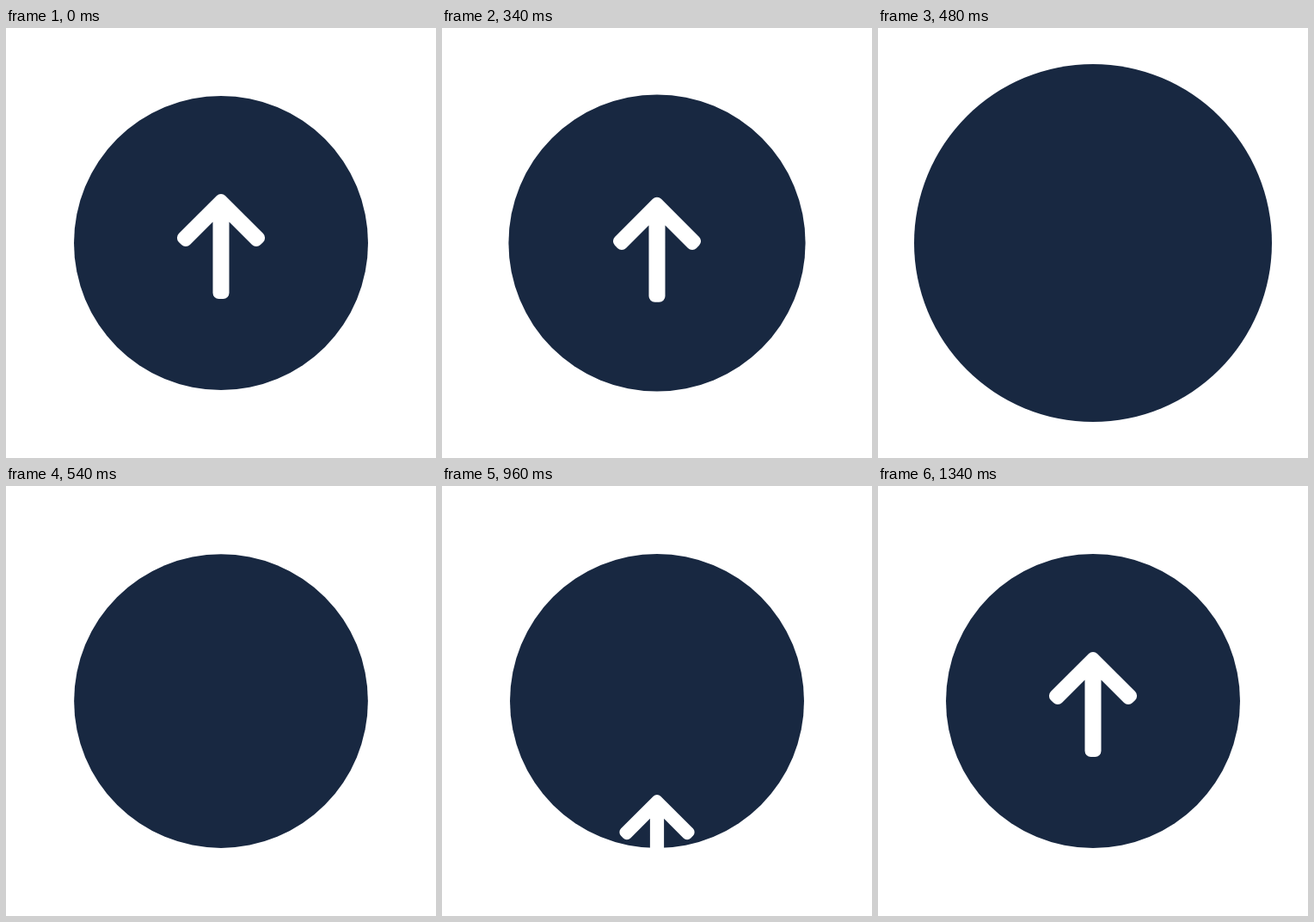
Animation, 500 px wide and 500 px high, one loop 1.36 s. Source, as an HTML page:

```html
<!DOCTYPE html>
<html lang="en">
<head>
<meta charset="utf-8">
<title>Arrow button</title>
<style>
html, body { margin: 0; width: 100%; height: 100%; overflow: hidden; background: #fff; }
svg { display: block; width: 100%; height: 100%; }
</style>
</head>
<body>
<svg viewBox="0 0 500 500">
  <circle id="disc" cx="250" cy="250" r="171" fill="#182841"/>
  <path id="arrow" fill="#fff" stroke="#fff" stroke-width="14" stroke-linejoin="round"
    d="M0-54.1L-44.1-10l3.1 3.1L-2.5-45.4V54H2.5V-45.4L41-6.9l3.1-3.1Z"/>
</svg>
<script>
const LOOP = 1360, STEP = 20;
const disc = document.getElementById('disc');
const arrow = document.getElementById('arrow');

const smooth = u => u * u * (3 - 2 * u);
const easeIn = u => u ** 3;
const easeOut = u => 1 - (1 - u) ** 3;

// Each key: [time, value, easing towards it]
function track(keys, t) {
  const i = keys.findIndex(k => k[0] > t);
  if (i < 0) return keys[keys.length - 1][1];
  if (i === 0) return keys[0][1];
  const [t0, v0] = keys[i - 1], [t1, v1, ease] = keys[i];
  return v0 + (v1 - v0) * ease((t - t0) / (t1 - t0));
}

const hold = () => 0;
const radius = [[320, 171], [480, 208, smooth], [560, 164, smooth], [660, 171, smooth]];
const shift = [[0, 0], [320, 4.4, smooth], [480, -275, easeIn],
  [940, 217, hold], [1140, -4, easeOut], [1340, 0, smooth]];
const scale = [[320, 1], [480, 0.8, easeIn], [940, 0.8, hold], [1140, 1, easeOut]];

function draw(t) {
  disc.setAttribute('r', track(radius, t));
  const y = 254 + track(shift, t);
  arrow.setAttribute('transform', `translate(250 ${y}) scale(${track(scale, t)})`);
  arrow.style.visibility = t >= 480 && t < 960 ? 'hidden' : 'visible';
}

const start = performance.now();
function tick() {
  const t = (performance.now() - start) % LOOP;
  draw(Math.floor(t / STEP) * STEP);
  requestAnimationFrame(tick);
}
tick();
</script>
</body>
</html>
```
